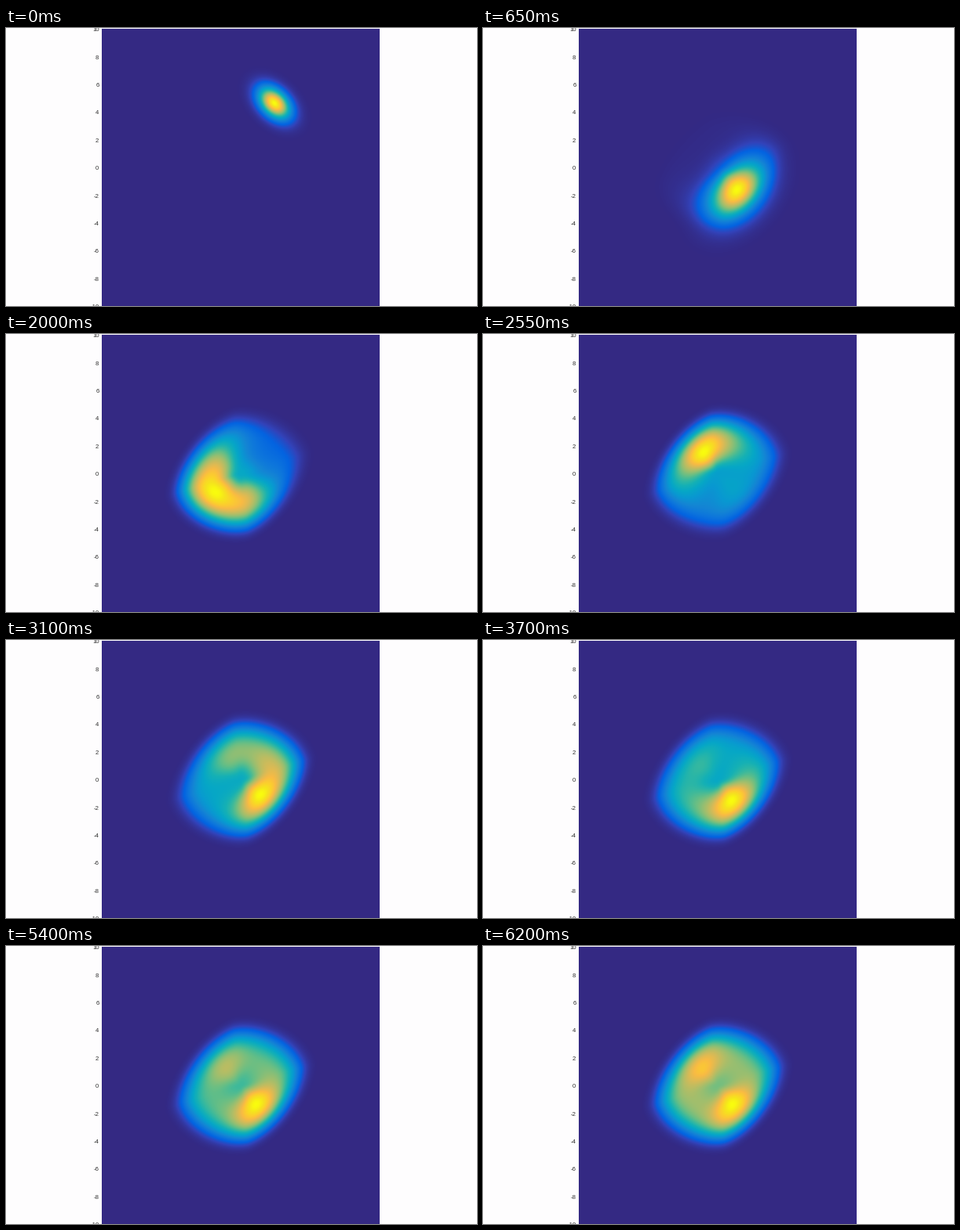
These frames come from a looping animation (600x355 px, 6.25 s). A matplotlib script:

```python
import numpy as np
import matplotlib.pyplot as plt
from matplotlib.animation import FuncAnimation
from matplotlib.colors import LinearSegmentedColormap

W, H, FRAMES = 600, 355, 125
CX, CY, UNIT = 299, 178, 17.7

HEX = ("342983 3243ba 0363e1 0d75dc 1485d4 0998d1 06a7c6 16b1b4 38b99e "
       "65be86 92bf73 b7bd64 d9ba56 f8bb44 fcce2e f5e41d f9fb0e").split()
STOPS = [min(4 * i, 63) / 63 for i in range(len(HEX))]
CMAP = LinearSegmentedColormap.from_list(
    "heat", [(s, "#" + h) for s, h in zip(STOPS, HEX)], N=512)

# Pixel offsets from the centre of the plot
X, Y = np.meshgrid(np.arange(122, 476) + 0.5 - CX, np.arange(1, 355) + 0.5 - CY)

# Oblique coordinates: the settled cloud is a rounded parallelogram
A = (78 * X - 9 * Y) / 6942
B = (-26 * X - 86 * Y) / 6942
Q = 1.62
RHO = (np.abs(A) ** Q + np.abs(B) ** Q) ** (1 / Q)
PHI = np.arctan2(B, A)


def bump(center, width):
    d = (np.degrees(PHI) - center + 180) % 360 - 180
    return np.exp(-(d / width) ** 2)


FALLOFF = np.exp(-(RHO / 0.819) ** 5.5)
RING = 1 - np.exp(-(RHO / 0.27) ** 2)
SETTLED = 0.62 + 0.38 * bump(-64, 40) + 0.22 * bump(118, 40)


def keyed(t, times, values):
    return np.interp(t, times, values)


def smooth(t, a, b):
    u = np.clip((t - a) / (b - a), 0, 1)
    return u * u * (3 - 2 * u)


def blob(t):
    """Early Gaussian packet, turning and spreading along its path."""
    times = [0, 4, 8, 13, 18, 25]
    x0 = keyed(t, times, [43, 52, 46, 26, 8, -10])
    y0 = keyed(t, times, [-82, -45, 0, 30, 38, 40])
    ang = np.radians(keyed(t, times, [45, 68, 95, 130, 155, 175]))
    major = keyed(t, times, [16, 19, 23, 28, 33, 36])
    minor = keyed(t, times, [10.5, 13, 16, 19, 21, 23])
    dx, dy = X - x0, Y - y0
    u = dx * np.cos(ang) + dy * np.sin(ang)
    v = dy * np.cos(ang) - dx * np.sin(ang)
    return np.exp(-0.5 * ((u / major) ** 2 + (v / minor) ** 2))


def cloud(t):
    """Ring density with a rotating crescent that fades with time."""
    times = [8, 13, 18, 25, 40, 62, 87, 108, 124]
    theta = np.radians(keyed(
        t, times, [-20, -62, -95, -130, -156, -360, -545, -770, -905]))
    k = keyed(t, times, [2.5, 1.9, 1.4, 1.05, 0.92, 0.37, 0.24, 0.1, 0.02])
    core = keyed(t, times, [0.4, 0.42, 0.46, 0.5, 0.56, 0.45, 0.5, 0.53, 0.55])
    around = SETTLED * np.exp(k * np.cos(PHI - theta))
    p = FALLOFF * (core * (1 - RING) + RING * around)
    return p / p.max()


def density(t):
    w = smooth(t, 7, 22)
    if w == 0:
        p = blob(t)
    elif w == 1:
        p = cloud(t)
    else:
        p = (1 - w) * blob(t) + w * cloud(t)
    return p / p.max()


fig = plt.figure(figsize=(W / 100, H / 100), dpi=100, facecolor="#fefdfe")
ax = fig.add_axes([0, 0, 1, 1])
ax.axis("off")
img = ax.imshow(density(0), cmap=CMAP, vmin=0, vmax=1, aspect="auto",
                extent=(122, 476, 355, 1), interpolation="nearest")
ax.set_xlim(0, W)
ax.set_ylim(H, 0)

for n in range(-10, 11, 2):
    ax.text(118.5, CY + 0.7 - n * UNIT, str(n), ha="right",
            va="center_baseline", fontsize=5.6, family="Liberation Sans",
            color="#303030")


def draw(i):
    img.set_data(density(i))
    return [img]


anim = FuncAnimation(fig, draw, frames=FRAMES, interval=50,
                     repeat=True, repeat_delay=0)
plt.show()
```
